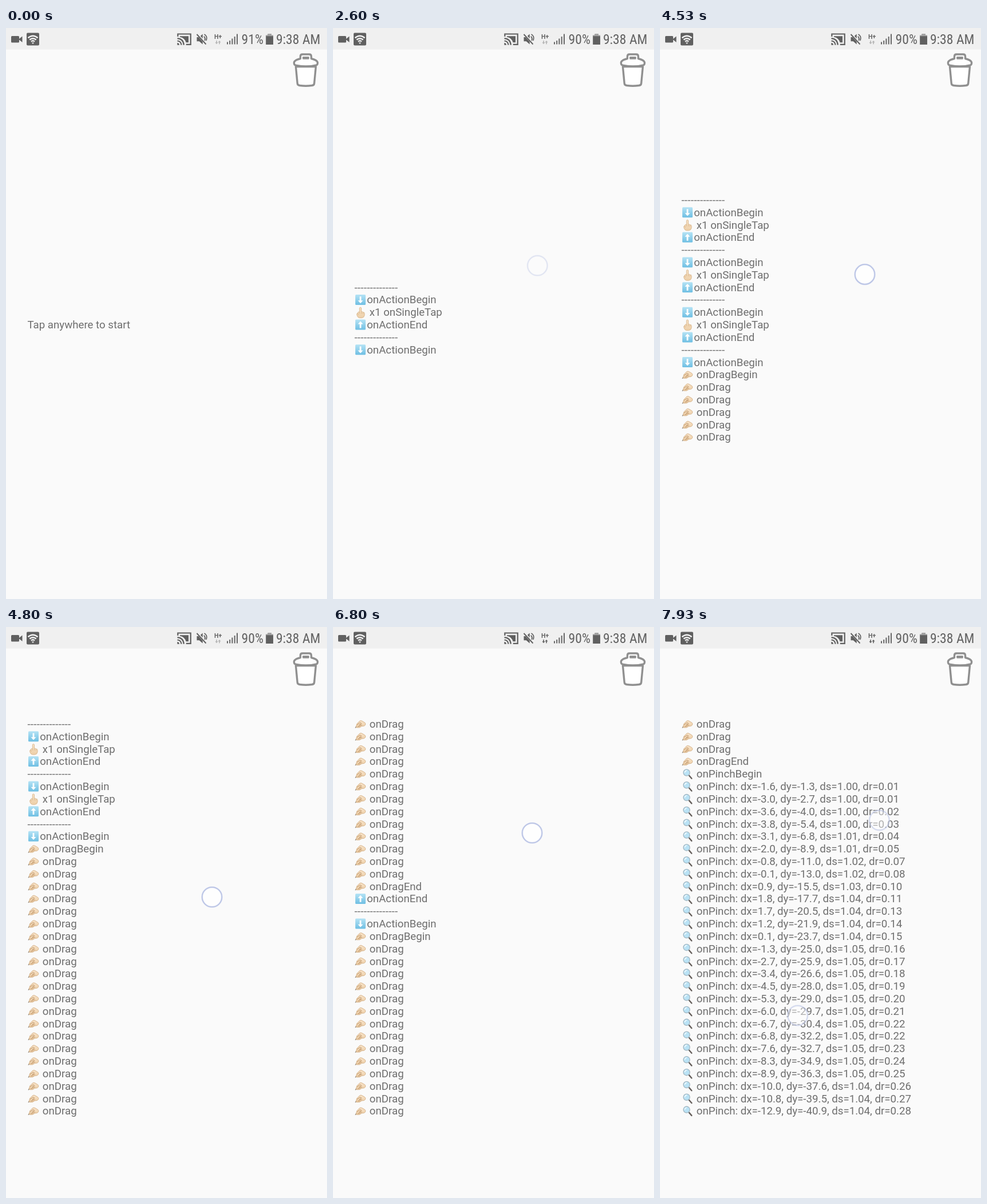
Write an HTML page that moves like this. It is 561 by 998 pixels and loops after 8000 ms.

```html
<!DOCTYPE html>
<html lang="en">
<head>
<meta charset="utf-8">
<title>Gesture log</title>
<style>
html, body { margin: 0; width: 100%; height: 100%; overflow: hidden; background: #fafafa; }
svg { display: block; width: 100%; height: 100%; }
text { font-family: Roboto, sans-serif; white-space: pre; }
#log text { font-size: 18.7px; fill: #6e6e6e; }
#log .rule { letter-spacing: .27px; }
#status text { fill: #626262; }
#status .label { font-family: "Roboto Condensed", Roboto, sans-serif; font-stretch: condensed; font-size: 23.7px; }
</style>
</head>
<body>
<svg viewBox="0 0 561 998" xmlns="http://www.w3.org/2000/svg">
  <defs>
    <linearGradient id="sky" x2="0" y2="1">
      <stop offset="0" stop-color="#b5e3f5"/><stop offset="1" stop-color="#6fbfe3"/>
    </linearGradient>
    <linearGradient id="skin" x2="0" y2="1">
      <stop offset="0" stop-color="#f8e3c8"/><stop offset="1" stop-color="#edcfa8"/>
    </linearGradient>
    <g id="down">
      <rect x=".7" y=".3" width="18" height="18" rx="1.5" fill="url(#sky)"/>
      <path d="M8.3 3.5h2.8v7h3.1l-4.5 5-4.5-5h3.1z" fill="#fff"/>
    </g>
    <g id="up">
      <rect x=".7" y=".3" width="18" height="18" rx="1.5" fill="url(#sky)"/>
      <path d="M8.3 15.2h2.8v-7h3.1l-4.5-5-4.5 5h3.1z" fill="#fff"/>
    </g>
    <g id="finger" fill="url(#skin)" stroke="#d5b084" stroke-width=".8" stroke-linejoin="round">
      <path d="M8 9V1.6q1.6-2 3.2 0V8.4q2.2-.8 2.8.8 2.8-.4 2.8 2.2v3.2q-.6 4.2-4.8 4.6H8q-2.800-.4-4-3.300l-.8-3.300q.3-1.700 1.800-1.500V9.800q1-1.800 3-.8z"/>
      <path d="M8 9v3M11.200 9v3M14 9.500v2.800M5 11l1 3" fill="none"/>
    </g>
    <g id="write" stroke-linejoin="round" stroke-linecap="round">
      <path d="M1 15.800 9 4.500" stroke="#8b8174" stroke-width="1.300"/>
      <path d="M2.200 13.500 3.500 9 8.200 4.200q2-1.500 4.200-.2l5 3q1.700 1.500.8 4l-2 1.700-4.200.6-4 2.300H3z" fill="url(#skin)" stroke="#cfa678" stroke-width=".8"/>
      <path d="M4 10.500 9 7l2.500 1.500-4 2.800 4.500.1M5 13.500l4-.3" fill="none" stroke="#b88d60" stroke-width=".9"/>
    </g>
    <g id="lens" stroke-linecap="round">
      <path d="M12.500 12 17 17.300" stroke="#66605c" stroke-width="2.400"/>
      <circle cx="8.200" cy="7" r="5.600" fill="#b9e2f5" stroke="#a3b7c2" stroke-width="1.300"/>
      <path d="M5 6.500Q5.500 4 8 3.500" fill="none" stroke="#fff" stroke-width="1.400"/>
    </g>
  </defs>

  <rect width="561" height="998" fill="#fafafa"/>
  <rect width="561" height="37.500" fill="#f0f0f0"/>

  <g id="status" fill="#606060">
    <rect x="9" y="14" width="14" height="11.500" rx="1.500"/>
    <path d="M22 19.700 28.500 14.500v10.500z"/>
    <rect x="36" y="8.500" width="22" height="22" rx="2"/>
    <g fill="none" stroke="#f4f4f4" stroke-width="2.400">
      <path d="M38.500 17.200q8.500-7 17 0M41.300 20.500q5.700-4.700 11.400 0M44 23.600q3-2.500 6 0"/>
    </g>
    <path d="M44.700 25.500h4.600L47 28z" fill="#f4f4f4"/>
    <g fill="none" stroke="#606060" stroke-width="2.200">
      <path d="M300.300 15v-4.500h22.400v18.300h-8"/>
      <path d="M299.500 18.200q10.500.8 11.300 11.500M299.500 22.500q6.500.7 7 7.200"/>
    </g>
    <path d="M299.300 26q3.500.2 3.700 3.700h-3.700z"/>
    <path d="M304 14.300h15v11h-4.500Q312 17 304 15.800z"/>
    <path d="M333.500 16h4.200l6-5.500v18l-6-5.300h-4.200z"/>
    <path d="M346 14.500q3.800 5 0 9.500M346.500 11q6 3 3.500 11" fill="none" stroke="#606060" stroke-width="1.800"/>
    <path d="M334 10.500 350 28" stroke="#f0f0f0" stroke-width="4"/>
    <path d="M333.500 11 349.500 28.500" stroke="#606060" stroke-width="1.900"/>
    <text x="364" y="19.300" font-size="10.500" font-weight="700">H+</text>
    <path id="data" d="M367.200 22v3h-1.700l2.500 3.300 2.500-3.300h-1.700v-3zM372.200 28.300v-3h-1.700l2.500-3.300 2.500 3.300h-1.700v3z"/>
    <path d="M387 28.500v-4M391.200 28.500v-6.500M395.400 28.500v-10M399.700 28.500v-13.500M404 28.500v-18" stroke="#606060" stroke-width="1.900"/>
    <text id="charge" class="label" x="411.500" y="28.300">91%</text>
    <path d="M457.500 10.500h6.500v2.300h3v16.200h-12.800V12.800h3.300z"/>
    <path d="M457.500 10.500h6.500v2.300h3v1.500h-12.800v-1.500h3.300z" fill="#a2a2a2"/>
    <text id="clock" class="label" x="549.500" y="28.300" text-anchor="end">9:38 AM</text>
  </g>

  <g fill="#fff" stroke="#909090" stroke-width="3.400" stroke-linejoin="round">
    <path d="M506.500 67.500 509.300 97q.3 3 4 3.500 10.700 1.600 21.400 0 3.700-.5 4-3.500l2.800-29.500z"/>
    <path d="M514.500 53.500v-4q.2-3.500 3.500-3.500h12q3.300 0 3.500 3.500v4q10 2.500 11 6.500.5 4-2 4.800-18.500 4.500-37 0-2.500-.8-2-4.800 1-4 11-6.500z"/>
    <path d="M519.500 53.500v-2.300h9v2.300z" fill="none" stroke-width="2.600"/>
  </g>

  <g id="log"></g>
  <g id="touches"></g>
</svg>

<script>
const LOOP = 8000, FPS = 15;
const PITCH = 21.82, MID_BASELINE = 525.1, MAX_ROWS = 32;
const $ = id => document.getElementById(id);

// Pinch readings: dx, dy, ds, dr
const PINCH = [
  [-1.6, -1.3, 1, .01], [-3, -2.7, 1, .01], [-3.6, -4, 1, .02], [-3.8, -5.4, 1, .03],
  [-3.1, -6.8, 1.01, .04], [-2, -8.9, 1.01, .05], [-.8, -11, 1.02, .07], [-.1, -13, 1.02, .08],
  [.9, -15.5, 1.03, .1], [1.8, -17.7, 1.04, .11], [1.7, -20.5, 1.04, .13], [1.2, -21.9, 1.04, .14],
  [.1, -23.7, 1.04, .15], [-1.3, -25, 1.05, .16], [-2.7, -25.9, 1.05, .17], [-3.4, -26.6, 1.05, .18],
  [-4.5, -28, 1.05, .19], [-5.3, -29, 1.05, .2], [-6, -29.7, 1.05, .21], [-6.7, -30.4, 1.05, .22],
  [-6.8, -32.2, 1.05, .22], [-7.6, -32.7, 1.05, .23], [-8.3, -34.9, 1.05, .24], [-8.9, -36.3, 1.05, .25],
  [-10, -37.6, 1.04, .26], [-10.8, -39.5, 1.04, .27], [-12.9, -40.9, 1.04, .28]
];

const log = [];
const add = (tick, icon, text) => log.push({ tick, icon, text });

function begin(tick) {
  add(tick, "", "-".repeat(14));
  add(tick, "down", "onActionBegin");
}
function tap(start, end) {
  begin(start);
  add(end, "finger", " x1 onSingleTap");
  add(end, "up", "onActionEnd");
}
function drag(start, count, end) {
  add(start - 1, "write", " onDragBegin");
  for (let i = 0; i < count; i++) add(start + Math.ceil(i / 4), "write", " onDrag");
  add(end, "write", " onDragEnd");
}
const pinchTick = i => i < 2 ? 111 + i : 113 + Math.ceil((i - 3) / 4);

tap(17, 21);
tap(36, 40);
tap(42, 45);
begin(65);
drag(67, 45, 79);
add(79, "up", "onActionEnd");
begin(95);
drag(98, 14, 106);
add(107, "lens", " onPinchBegin");
PINCH.forEach(([dx, dy, ds, dr], i) => add(pinchTick(i), "lens",
  ` onPinch: dx=${dx.toFixed(1)}, dy=${dy.toFixed(1)}, ds=${ds.toFixed(2)}, dr=${dr.toFixed(2)}`));

function row({ icon, text }, y) {
  if (!icon) return `<text class="${text[0] === "-" ? "rule" : ""}" x="37.4" y="${y}">${text}</text>`;
  const indent = text[0] === " " ? 4.6 : 0;
  return `<use href="#${icon}" x="38.3" y="${y - 15.8}"/>` +
    `<text x="${59.2 + indent}" y="${y}">${text.trim()}</text>`;
}

function drawLog(tick) {
  const rows = log.filter(e => e.tick <= tick).slice(-MAX_ROWS);
  if (!rows.length) return row({ text: "Tap anywhere to start" }, MID_BASELINE);
  return rows.map((e, i) => row(e, MID_BASELINE + (i - rows.length / 2) * PITCH)).join("");
}

const ramp = (v, from, to) => Math.min(1, Math.max(0, (v - from) / (to - from)));

function touchesAt(tick) {
  const list = [];
  // A finger is solid from start and fades on its last tick.
  const press = (start, last, x, y) => {
    if (tick >= start && tick <= last) list.push([x, y, tick === last ? .4 : 1]);
  };
  press(16, 20, 363.5, 409.5);
  press(35, 39, 357.3, 415.3);
  press(41, 44, 361.5, 417);
  press(64, 78, 357 + 3 * ramp(tick, 66, 72), 410 + 62 * ramp(tick, 66, 72) + 30 * ramp(tick, 72, 78));

  if (tick >= 95 && tick < 111) {
    list.push([348, 336.7 + 23.3 * ramp(tick, 96, 102), 1]);
    if (tick >= 105) list.push([296, 715, tick === 105 ? .5 : 1]);
  } else if (tick >= 111) {
    const [dx, dy, ds, dr] = PINCH.filter((_, i) => pinchTick(i) <= tick).pop();
    const cx = 322 + 1.1 * (dx + 3.8), cy = 537.5 + .82 * (dy + 5.4);
    const half = (358.8 + 280 * (ds - 1)) / 2, angle = .116 + dr;
    const ox = half * Math.sin(angle), oy = half * Math.cos(angle);
    const alpha = 1 - .4 * ramp(tick, 113, 119);
    list.push([cx + ox, cy - oy, alpha], [cx - ox, cy + oy, alpha]);
  }
  return list;
}

const drawTouch = ([x, y, alpha]) =>
  `<g opacity="${alpha}"><circle cx="${x}" cy="${y}" r="17.3" fill="#fff" fill-opacity=".75"/>` +
  `<circle cx="${x}" cy="${y}" r="17.3" fill="none" stroke="#dde2f4" stroke-width="3"/>` +
  `<circle cx="${x}" cy="${y}" r="17.3" fill="none" stroke="#b7c1e3" stroke-width="1.5"/></g>`;

function draw(tick) {
  $("charge").textContent = tick < 28 ? "91%" : "90%";
  const busy = (tick >= 40 && tick < 55) || tick >= 100;
  $("data").setAttribute("fill", busy ? "#606060" : "#b4b4b4");
  $("log").innerHTML = drawLog(tick);
  $("touches").innerHTML = touchesAt(tick).map(drawTouch).join("");
}

// Wider fallback face: use a smaller size for the status labels.
const clockWidth = $("clock").getComputedTextLength();
if (clockWidth > 80) document.querySelectorAll(".label").forEach(el => {
  el.style.fontSize = "20.8px";
  el.setAttribute("y", 27.5);
});

const origin = performance.now();
let shown = -1;
function loop() {
  const time = (performance.now() - origin) % LOOP;
  const tick = Math.floor((time + 5) * FPS / 1000) % (LOOP * FPS / 1000);
  if (tick !== shown) draw(shown = tick);
  requestAnimationFrame(loop);
}
loop();
</script>
</body>
</html>
```
